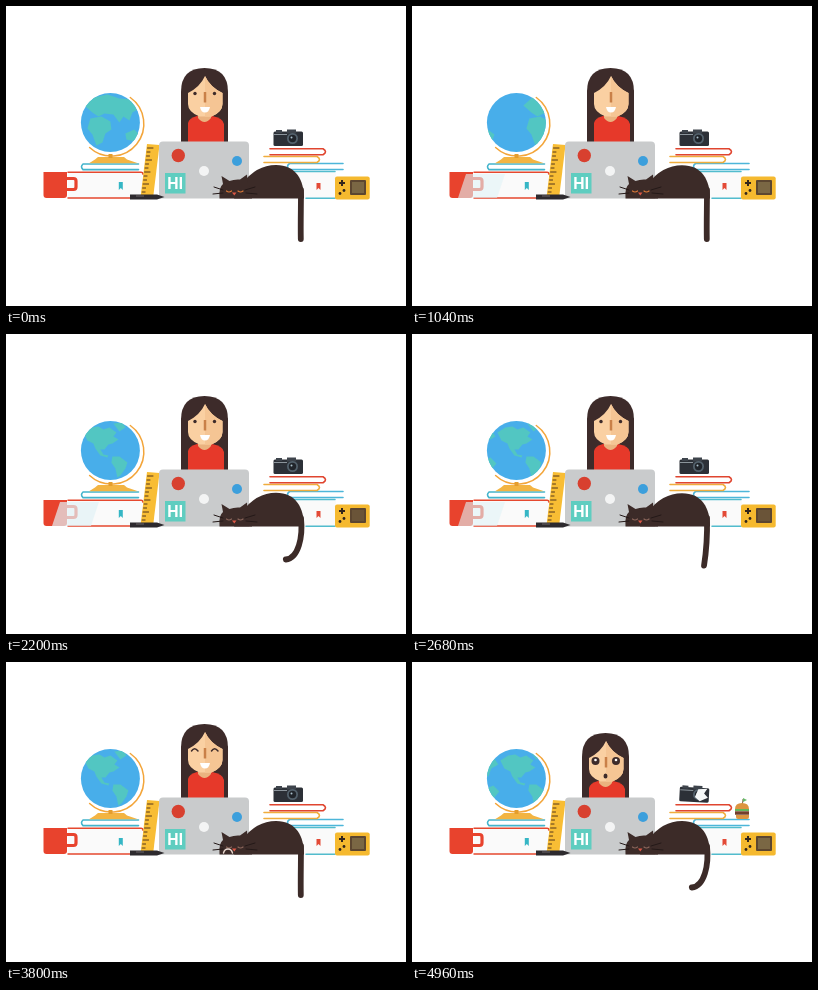
An HTML page that plays this animation: 400x300 px, repeating every 5000 ms.

```html
<!DOCTYPE html>
<html lang="en">
<head>
<meta charset="utf-8">
<title>Desk with cat</title>
<style>
html, body { margin: 0; width: 100%; height: 100%; overflow: hidden; background: #fff; }
svg { display: block; width: 100vw; height: 100vh; }
.line { fill: none; stroke-linecap: round; stroke-linejoin: round; }
</style>
</head>
<body>
<svg viewBox="0 0 400 300">
  <defs>
    <clipPath id="ball"><circle cx="104.400" cy="116.600" r="29.500"/></clipPath>
    <g id="world" fill="#52c6c2">
      <path d="M-24-18l8-5 7-1 5 3 6-2 7 5-3 4 5 3-6 4-4 1-4 5-4 0 3 5 5 1-1 2-7-2-5-7-2-5-6-3z"/>
      <path d="M5 6l7 0 8 6-2 6-5 7-3 2-2-9-4-6z"/>
      <path d="M6-27l9-1 3 5-6 4z"/>
      <path d="M49-17l9-8 14-3 12 4 14 1 6 9-7 4-3 8-6-4-4 6-6-8-9-1-6 3-6-4z"/>
      <path d="M55-4l11-2 9 5 1 8-6 4-3 9-6 3-4-11-5-6z"/>
      <path d="M90 11l9-4 6 6-5 6-9-2z"/>
    </g>
  </defs>

  <!-- left books -->
  <path d="M62 166h74v26H62z" fill="#fafafa"/>
  <path d="M62 166.300h73q2 0 2 2M137 190q0 2-2 2H62" class="line" stroke="#e5482f" stroke-width="1.500"/>
  <path d="M112.800 176h4v8l-2-2-2 2z" fill="#35b6c5"/>
  <path d="M132.500 158H77q-3 2.800 0 5.600h55.500" class="line" stroke="#43b4cc" stroke-width="1.600"/>

  <!-- globe -->
  <path d="M92 151h26l3 2.500 11 3.800H83l6-3.800z" fill="#f3b442"/>
  <path d="M124.300 91.500A32.300 32.300 0 1 1 83.600 141.500" class="line" stroke="#f3a53a" stroke-width="1.500"/>
  <path d="M102.500 148h4v4h-4z" fill="#e59d2c"/>
  <circle cx="104.400" cy="116.600" r="29.500" fill="#48aeea"/>
  <g clip-path="url(#ball)"><g id="land"><use href="#world"/><use href="#world" x="-130"/><use href="#world" x="130"/></g></g>

  <!-- mug -->
  <rect x="59" y="172.500" width="11" height="11" rx="2.500" class="line" stroke="#e8432d" stroke-width="3.200"/>
  <path d="M37.500 166H61v23q0 3-3 3H40.500q-3 0-3-3z" fill="#e8432d"/>
  <path id="glass" d="M54 168h39l-8 24H46z" fill="#e2f3f7"/>

  <!-- ruler -->
  <path d="M141 138l12.500 1-6.500 53.500-12.500-1z" fill="#f8bd34"/>
  <path id="ticks" class="line" stroke="#54371c"/>

  <!-- right books -->
  <path d="M256 166h74v26h-74z" fill="#fafafa"/>
  <path d="M257 165.500h72M300 192.300h29" class="line" stroke="#52bccd" stroke-width="1.500"/>
  <path d="M310.500 177h4v7l-2-2-2 2z" fill="#e34a36"/>
  <path id="blue" d="M337 157.500H283.500q-4 3 0 6H337" class="line" stroke="#4db6d9" stroke-width="1.600"/>
  <path id="gold" d="M258 150.500H311q5 3 0 6H258" class="line" stroke="#f0ad3c" stroke-width="1.600"/>
  <path id="red" d="M264 142.800H317q5 3 0 6H264" class="line" stroke="#e0452f" stroke-width="1.600"/>
  <g id="camera">
    <rect x="267.500" y="125.500" width="29.500" height="14.500" rx="1.500" fill="#2c3037"/>
    <path d="M270 124h6v3h-6zM281 123.500h9v4h-9z" fill="#3e444c"/>
    <path d="M268 128.500h13" stroke="#8b949b"/>
    <circle cx="286.500" cy="132.500" r="5.500" fill="#53616c"/>
    <circle cx="286.500" cy="132.500" r="3.700" fill="#20242a"/>
    <circle cx="285.500" cy="131.500" r="1" fill="#aac0cc"/>
    <path id="flash" d="M286 127l9-1-3 5 4 4-8 4-5-4z" fill="#f5f7f8"/>
  </g>
  <g id="burger">
    <path d="M330 146l1-9" stroke="#82654a"/>
    <path d="M331 136l4 2-4 2z" fill="#67b969"/>
    <path d="M323 147q0-6 7-6t7 6z" fill="#dc9440"/>
    <path d="M323 148h14" stroke="#64b75b" stroke-width="2"/>
    <path d="M323 151h14" stroke="#733f2b" stroke-width="3.500"/>
    <path d="M324 153h13v2q0 2-2 2h-9q-2 0-2-2z" fill="#dc9440"/>
  </g>

  <!-- handheld game -->
  <rect x="329" y="170.500" width="34.700" height="23" rx="2" fill="#f5b92f"/>
  <rect x="344" y="174" width="16" height="15" rx="1" fill="#5c4630"/>
  <rect id="screen" x="346" y="176" width="12" height="11"/>
  <path d="M333 177h6M336 174v6" stroke="#33261c" stroke-width="2"/>
  <g fill="#33261c"><circle cx="334" cy="187.500" r="1.400"/><circle cx="338" cy="184.500" r="1.400"/></g>

  <!-- woman -->
  <g id="woman">
    <path d="M175 150V86q0-24 23.500-24T222 86v64z" fill="#3d2b2a"/>
    <path d="M182 150v-33q1-5 9-7h15q11 2 12 8v32z" fill="#e6392a"/>
    <path d="M192 105h13v7q-6.500 8-13 0z" fill="#eab27f"/>
    <path d="M182 87q12-6 17-17 5 11 17.500 17v11q0 8-11 12.500h-12Q182 106 182 98z" fill="#fad0a2"/>
    <path d="M199 70q5 11 17.500 17v11q0 8-11 12.500H199z" fill="#f5c594"/>
    <path d="M199 86v10.500" stroke="#c98048" stroke-width="2.500"/>
    <g id="open" fill="#3d2b2a"><circle cx="189" cy="87.500" r="1.700"/><circle cx="208.500" cy="87.500" r="1.700"/></g>
    <path id="happy" d="M185.500 89q3-4.500 6.500 0M205.500 89q3-4.500 6.500 0" class="line" stroke="#3d2b2a" stroke-width="1.500"/>
    <g id="wide">
      <g fill="#3d2b2a"><circle cx="188.500" cy="90" r="4"/><circle cx="209" cy="90" r="4"/><ellipse cx="198.500" cy="105" rx="2" ry="2.500"/></g>
      <g fill="#fff"><circle cx="188.500" cy="89" r="1.300"/><circle cx="209" cy="89" r="1.300"/></g>
    </g>
    <path id="smile" d="M194 101h10q-1 5.500-5 5.500t-5-5.500z" fill="#fff"/>
  </g>

  <!-- laptop -->
  <path d="M157 135.500h82q4 0 4 4v53h-90v-53q0-4 4-4z" fill="#c9cbcc"/>
  <circle cx="172.300" cy="149.500" r="6.700" fill="#d8402f"/>
  <circle cx="198" cy="165" r="5" fill="#f3f4f4"/>
  <circle cx="231" cy="155" r="5" fill="#3c9fdc"/>
  <rect x="159" y="167" width="20.500" height="20.500" fill="#5fcdc0"/>
  <text x="169.300" y="183" text-anchor="middle" font-family="Roboto, Arial, sans-serif" font-weight="700" font-size="16" fill="#fff">HI</text>

  <!-- pen -->
  <path d="M124 188.500h27l7.500 2.500-7.500 2.500h-27z" fill="#2d2a2e"/>
  <path d="M130 190h8" stroke="#6a6468"/>

  <!-- cat -->
  <path id="tail" class="line" stroke="#3c2b28" stroke-width="5.800"/>
  <g fill="#3c2b28">
    <path id="body"/>
    <path d="M213.500 192.500q-1-11 3.500-14.500l-1.500-8 8 5q5-2 10.500-1.500l7-5 .5 9q5 5 4.500 15z"/>
  </g>
  <path d="M217 184l-9-3M217 187l-10 1M239 184l10-3M240 187l11 1" class="line" stroke="#241918"/>
  <path id="lids" d="M220.500 185q2.500 2 5 0M232 185q2.500 2 5 0" class="line" stroke-width="1.200"/>
  <path d="M226 186.500h4.500l-2.200 3z" fill="#dc5846"/>
  <path id="peek" d="M217.500 191q1-4 4.500-4t4.500 4" class="line" stroke="#ead9d0" stroke-width="1.400"/>
</svg>
<script>
const LOOP = 5000;
const $ = id => document.getElementById(id);
const move = (id, x, y, turn = 0, cx = 0, cy = 0) =>
  $(id).setAttribute('transform', `translate(${x} ${y}) rotate(${turn} ${cx} ${cy})`);
const fade = (id, v) => $(id).setAttribute('opacity', v);
const within = (t, a, b) => t >= a && t < b ? 1 : 0;

// steps: [time, value] pairs, eased between neighbours
function track(steps, t) {
  const n = steps.findIndex(s => s[0] > t);
  if (n === 0) return steps[0][1];
  if (n < 0) return steps[steps.length - 1][1];
  const [t0, a] = steps[n - 1], [t1, b] = steps[n];
  const p = (t - t0) / (t1 - t0);
  return a + (b - a) * p * p * (3 - 2 * p);
}

const SPIN = [[0, -75], [1040, -42], [2200, -3], [3160, 13], [3800, -2], [4480, 3], [5000, 8]];
const CURL = [[0, 0], [1200, 0], [1700, 1], [2260, 1], [2840, 0], [4500, 0], [4900, 1]];
const GLASS = [[0, 0], [600, 0], [1040, .6], [2200, .7], [3160, .5], [3700, 0]];
const HOP = [[4340, 0], [4480, 1], [4640, 0], [4710, .12], [4780, 0]];
const DROP = [[4240, -60], [4400, 0]];
const LEAN = [[4600, 0], [4840, 1]];

let marks = '';
for (let i = 0; i < 12; i++) {
  const y = 142 + i * 4, x = 141.500 - i * .49;
  marks += `M${x} ${y}h${i % 3 ? 3 : 5.5}`;
}
$('ticks').setAttribute('d', marks);

function draw(t) {
  move('land', 104.4 + track(SPIN, t), 116.6);
  fade('glass', track(GLASS, t));

  const hop = track(HOP, t), lean = track(LEAN, t);
  move('camera', 0, -26 * hop, 3 * hop + 3 * lean, 283, 133);
  move('red', 0, -15.5 * hop, 4 * hop, 292, 146);
  move('gold', 0, -3 * hop, hop, 285, 153);
  move('blue', 0, -hop, 3 * hop, 310, 160);
  move('burger', 0, track(DROP, t));
  fade('burger', within(t, 4240, LOOP));
  fade('flash', within(t, 4880, LOOP));

  move('woman', -5 * lean, 9 * lean);
  const happy = within(t, 2800, 4200), wide = within(t, 4640, LOOP), blink = within(t, 980, 1120);
  fade('happy', happy);
  fade('wide', wide);
  fade('smile', 1 - wide);
  fade('open', 1 - Math.max(happy, wide, blink));

  const k = track(CURL, t);
  $('tail').setAttribute('d',
    `M295 184C${295 + 2 * k} ${200 + 3 * k} ${294.5 - 2 * k} ${217 + 7 * k} ${294.8 - 15 * k} ${233 - 7.5 * k}`);
  const top = 159 + .4 * Math.sin(t / LOOP * Math.PI * 4);
  $('body').setAttribute('d',
    `M228 192.500L236 178Q250 ${top} 270 ${top}C290 ${top} 298 174 298 192.500Z`);
  fade('peek', within(t, 3600, 4700));
  $('lids').setAttribute('stroke', t < 1200 ? '#e07a38' : '#8d675c');
  $('screen').setAttribute('fill', within(t, 2000, 3400) ? '#6a5438' : '#7a6744');
}

const start = performance.now();
function tick() {
  draw((performance.now() - start) % LOOP);
  requestAnimationFrame(tick);
}
tick();
</script>
</body>
</html>
```
